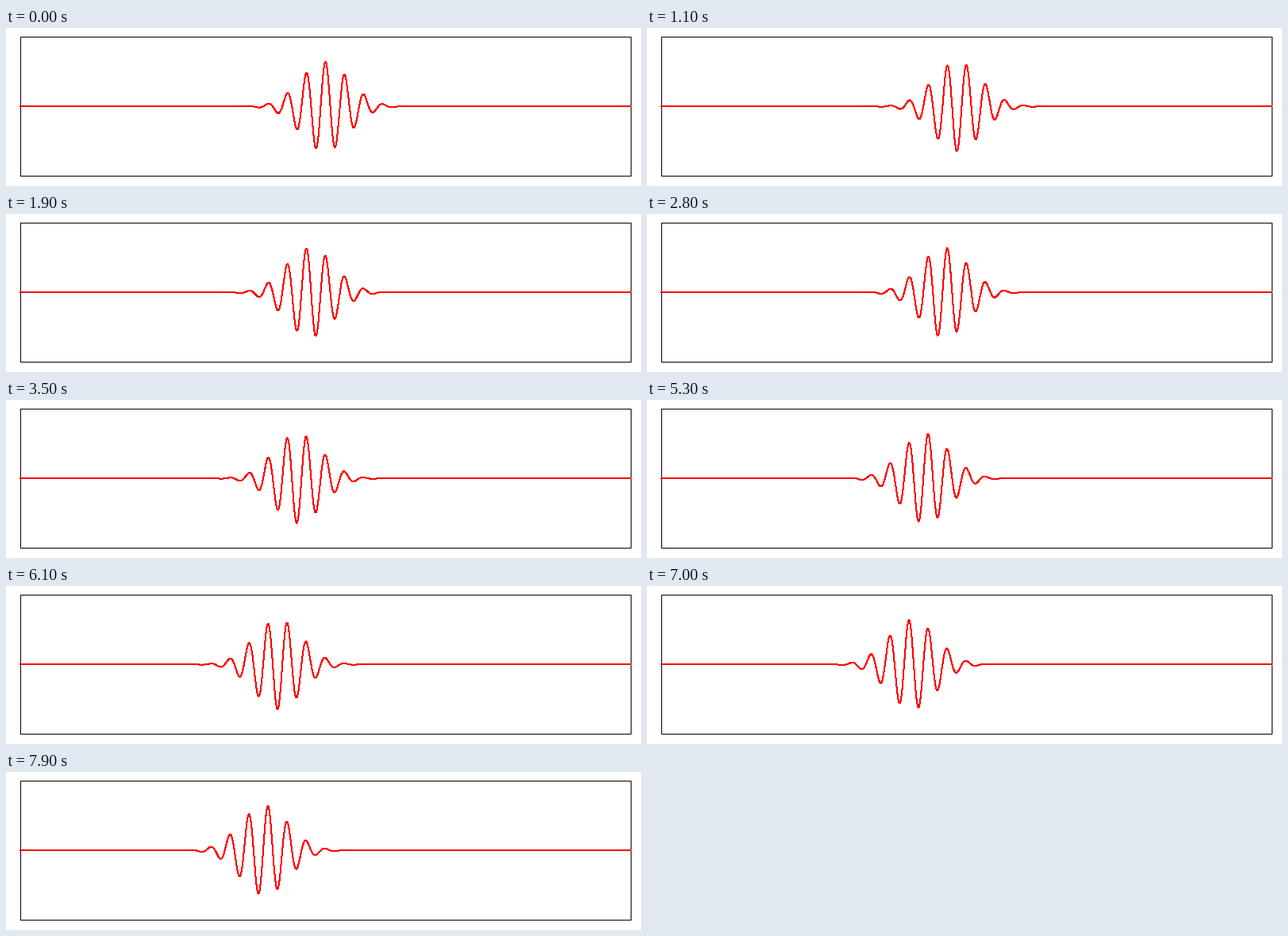
Write a matplotlib script that moves like this. It is 800 px wide and 200 px high and loops after 8 s.

```python
import numpy as np
import matplotlib.pyplot as plt
from matplotlib.animation import FuncAnimation
from matplotlib.patches import Rectangle

W, H, DPI = 800, 200, 100
FRAMES, INTERVAL = 80, 100
LEFT, RIGHT, TOP, BOTTOM = 18, 787, 11, 187
BASELINE, HEIGHT = 99.3, 56.5
STEP = 0.025  # envelope shift per frame, in data units


def px(width):
    """Convert a width in pixels to points."""
    return width * 72 / DPI


fig = plt.figure(figsize=(W / DPI, H / DPI), dpi=DPI, facecolor="white")
ax = fig.add_axes([0, 0, 1, 1])
ax.set_xlim(0, W)
ax.set_ylim(H, 0)
ax.axis("off")

ax.add_patch(Rectangle((LEFT, TOP), RIGHT - LEFT, BOTTOM - TOP, fill=False,
                       edgecolor="black", linewidth=px(1), antialiased=False,
                       snap=True))

# The plot spans x = -10 to 10.
x = np.linspace(-10, 10, 1539)
screen_x = LEFT + (x + 10) / 20 * (RIGHT - LEFT)
carrier = np.cos(10 * x)

# Without antialiasing every touched pixel is filled, so this looks 2 px wide.
wave, = ax.plot([], [], color="red", linewidth=px(1), antialiased=False,
                snap=False, solid_joinstyle="round", zorder=3)


def update(frame):
    # The envelope drifts left over a standing carrier.
    center = -STEP * (frame + 1)
    packet = np.exp(-0.8 * (x - center) ** 2) * carrier
    wave.set_data(screen_x, BASELINE - HEIGHT * packet)
    return wave,


anim = FuncAnimation(fig, update, frames=FRAMES, interval=INTERVAL,
                     repeat=True, repeat_delay=0, blit=False)
plt.show()
```
